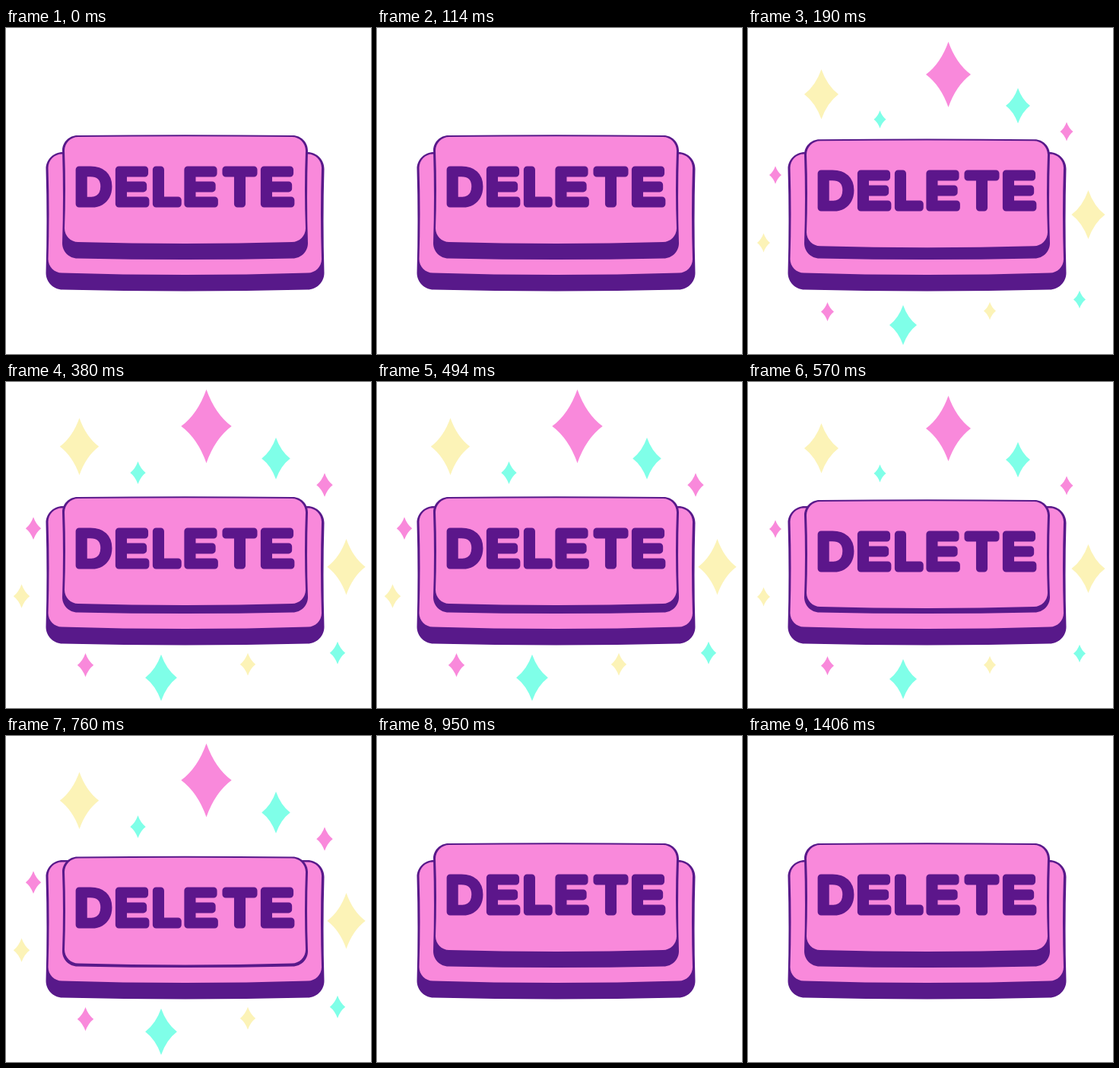
An HTML page for the animation above (1.71 s loop, 480 px wide and 428 px high).

```html
<!DOCTYPE html>
<html lang="en">
<head>
<meta charset="utf-8">
<title>Delete button</title>
<style>
  html, body { margin: 0; width: 100%; height: 100%; overflow: hidden; background: #fff; }
  svg { display: block; width: 480px; height: 428px; }
  .dark { fill: #58198a; }
  .pink { fill: #f989db; }
  .cyan { fill: #7fffe8; }
  .yellow { fill: #fcf3b7; }
  text {
    font: 65.5px "Liberation Sans", Arial, sans-serif;
    fill: #5c168b; stroke: #5c168b; stroke-width: 9; stroke-linejoin: round;
  }
</style>
</head>
<body>
<svg viewBox="0 0 480 428">
  <g id="sparkles"></g>
  <path class="dark" id="baseEdge"/>
  <path class="pink" id="baseFace"/>
  <path class="dark" id="keyEdge"/>
  <path class="pink" id="keyFace"/>
  <text id="label" y="230.5" x="90.8 143 192 233.6 287.5 334">DELETE</text>
</svg>
<script>
const STEP = 190, LOOP = 1710, REST = 5;

// Sparkle centres and half widths by colour
const SPARKLES = {
  pink: [[263.5, 61, 29.5], [419, 136, 8.5], [36, 193, 8], [104.5, 372.5, 8.5]],
  cyan: [[355, 102, 16], [173.5, 120, 8], [204, 390, 18], [436, 356.5, 8]],
  yellow: [[96.5, 87, 22.5], [447.5, 245, 22], [20.5, 282, 8.5], [318, 371.5, 8]]
};

const $ = id => document.getElementById(id);
const setPath = (id, d) => $(id).setAttribute('d', d);

// Rounded box with sides pinched in and a bottom edge that sags
function softBox(l, t, r, b, rad, sag) {
  const k = rad * 0.45, pinch = 2, midX = (l + r) / 2, midY = (t + b) / 2;
  return `M${l},${t + rad}C${l},${t + k} ${l + k},${t} ${l + rad},${t}
    Q${midX},${t - 1.5} ${r - rad},${t}C${r - k},${t} ${r},${t + k} ${r},${t + rad}
    Q${r - pinch},${midY} ${r},${b - rad}C${r},${b - k} ${r - k},${b} ${r - rad},${b}
    Q${midX},${b + sag} ${l + rad},${b}C${l + k},${b} ${l},${b - k} ${l},${b - rad}
    Q${l + pinch},${midY} ${l},${t + rad}Z`;
}

// Four-pointed star; when large, wide ones grow and rise the most
function sparkle(x, y, size, large) {
  const w = size + large * (1.6 + size * 0.07), h = w * 1.46, c = 0.34;
  const p = (u, v) => `${x + u * w},${y - large * size * 0.1 + v * h}`;
  return `M${p(0, -1)}Q${p(c, -c)} ${p(1, 0)}Q${p(c, c)} ${p(0, 1)}
    Q${p(-c, c)} ${p(-1, 0)}Q${p(-c, -c)} ${p(0, -1)}Z`;
}

function draw(step) {
  const pressed = step % REST;
  const dy = pressed * (5.6 - 0.3 * pressed);
  const large = pressed % 2 ? 0 : 1;
  setPath('keyEdge', softBox(74, 141 + dy, 397, 302.5, 20, 3));
  setPath('keyFace', softBox(77, 143 + dy, 394, 281 + dy, 18, 4));
  $('label').setAttribute('transform', `translate(0 ${dy})`);
  $('sparkles').innerHTML = !pressed ? '' : Object.entries(SPARKLES).map(([colour, stars]) =>
    `<path class="${colour}" d="${stars.map(s => sparkle(...s, large)).join('')}"/>`).join('');
}

setPath('baseEdge', softBox(52.5, 163, 418.5, 343.5, 22, 4));
setPath('baseFace', softBox(55.5, 165.5, 415, 321.5, 18, 5));

let start, shown;
function tick(now) {
  start ??= now;
  const step = Math.min(REST, Math.floor((now - start) % LOOP / STEP));
  if (step !== shown) draw(shown = step);
  requestAnimationFrame(tick);
}
draw(0);
requestAnimationFrame(tick);
</script>
</body>
</html>
```
